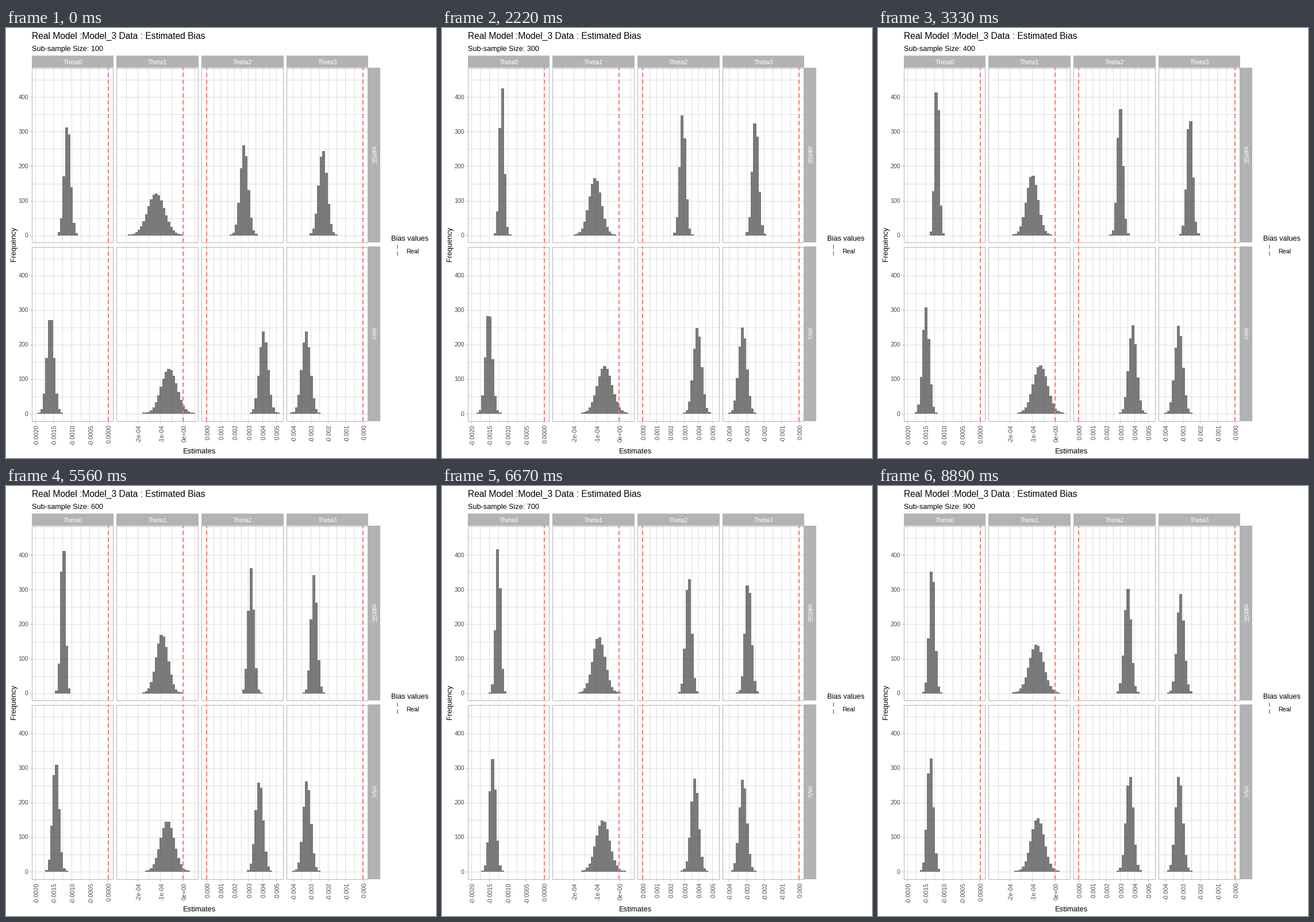
These frames come from a looping animation (748x748 px, 10 s). A matplotlib script:

```python
import math

import numpy as np
import matplotlib.pyplot as plt
from matplotlib.animation import FuncAnimation
from matplotlib.collections import LineCollection
from matplotlib.patches import Polygon, Rectangle

plt.rcParams["font.family"] = "Liberation Sans"
SIZE, DPI = 748, 100
PX = 72 / DPI
GREY, GRID, RED = "#b3b3b3", "#dedede", "#f8766d"
LEFT, PITCH, PANEL_W = 45.2, 147.69, 141.5
TOPS, PANEL_H = (69, 380), 304
BINS, BIN_W, PAD = 30, 4.287, 6.43
ZEROS, Y_UNIT = (360.2, 670.6), 0.6013
STEPS, FRAMES, LOOP = 9, 100, 10000

# Centre (in bins) of each histogram at sizes 100, 400 and 900
CENTRES = (((12.4, 11.4, 9.4), (13.9, 15.6, 17.3), (15.2, 16.8, 19.9), (12.7, 10.6, 6.9)),
           ((5.5, 6.9, 8.7), (19.2, 18.9, 17.8), (23.1, 21.9, 20.7), (5.9, 6.2, 6.3)))
# Spread over the same sizes for each row, scaled for each column
SPREADS = ((1.5, 1.04, 1.29), (1.66, 1.54, 1.4))
SCALES = ((0.79, 2.2, 1, 1.06), (0.82, 1.85, 1, 1))

# Zero x, tick spacing in pixels, tick range, value of one tick, label format
AXES = ((177.6, 31.65, range(-4, 1), 0.0005, ".4f"),
        (308.4, 39.6, range(-2, 1), 0.0001, ".0e"),
        (349.2, 24.25, range(0, 6), 0.001, ".3f"),
        (621.3, 30.4, range(-4, 1), 0.001, ".3f"))

fig = plt.figure(figsize=(SIZE / DPI, SIZE / DPI), dpi=DPI, facecolor="white")
ax = fig.add_axes([0, 0, 1, 1])
ax.set(xlim=(0, SIZE), ylim=(SIZE, 0))
ax.axis("off")


def text(x, y, s, size, color="black", ha="left", angle=0):
    return ax.text(x, y, s, size=size * PX, color=color, ha=ha, va="baseline",
                   rotation=angle, rotation_mode="anchor")


def mid(v):
    return math.floor(v) + 0.5


def lines(segments, color, z):
    ax.add_collection(LineCollection(segments, colors=color, linewidths=PX, zorder=z))


def vline(x, y0, y1):
    ax.plot([x, x], [y0, y1], color=RED, lw=2 * PX, dashes=(3.5, 2.5),
            dash_capstyle="butt", zorder=4)


def strip(x, y, w, h):
    ax.add_patch(Rectangle((x, y), w, h, color=GREY, lw=0, zorder=2))


def through(keys, n):
    """Parabola in sqrt(n) through the values at 100, 400 and 900."""
    a, b, c = keys
    t = math.sqrt(n) / 10 - 2
    return b + (c - a) / 2 * t + ((a + c) / 2 - b) * t * t


def histogram(row, col, n):
    mu = through(CENTRES[row][col], n)
    sd = SCALES[row][col] * through(SPREADS[row], n)
    cdf = [0.5 * (1 + math.erf((i - 0.5 - mu) / (sd * math.sqrt(2))))
           for i in range(BINS + 1)]
    counts = np.round(1000 * np.diff(cdf))
    base = math.floor(ZEROS[row]) + 1
    tops = np.where(counts > 0, np.floor(ZEROS[row] - Y_UNIT * counts), base)
    tops = np.concatenate(([base], tops, [base]))
    edges = np.floor(LEFT + PITCH * col + PAD + BIN_W * np.arange(BINS + 1))
    edges += np.diff(tops) > 0  # falling sides include their last pixel
    return np.column_stack((np.repeat(edges, 2), np.repeat(tops, 2)[1:-1]))


bars = {}
for row, top in enumerate(TOPS):
    bottom = top + PANEL_H
    levels = [ZEROS[row] - Y_UNIT * v for v in range(0, 451, 50)]
    for col, (zero, step, ticks, unit, form) in enumerate(AXES):
        left = mid(LEFT + PITCH * col)
        right = mid(LEFT + PITCH * col + PANEL_W)
        halves = range(2 * ticks[0] - 1, 2 * ticks[-1] + 2)
        xs = [mid(zero + step * h / 2) for h in halves]
        lines([[(x, top), (x, bottom)] for x in xs if left < x < right]
              + [[(left, mid(y)), (right, mid(y))] for y in levels], GRID, 1)
        bars[row, col] = ax.add_patch(Polygon(
            histogram(row, col, 100), facecolor="#595959", alpha=0.8,
            lw=0, antialiased=False, zorder=3))
        vline(round(zero), bottom, top)
        ax.add_patch(Rectangle((left, top + 0.5), right - left, PANEL_H - 1,
                               fill=False, edgecolor=GREY, lw=PX, zorder=5))
        if row:
            for k in ticks:
                x = zero + step * k
                lines([[(mid(x), bottom), (mid(x), bottom + 3)]], GREY, 2)
                text(x + 5.3, 690, format(k * unit, form), 10.6, "#4d4d4d", "right", 90)
        else:
            strip(left - 0.5, 48, right - left + 1, 21)
            text((left + right) / 2, 63, f"Theta{col}", 10.6, "white", "center")
    for v, y in zip(range(0, 401, 100), levels[::2]):
        lines([[(42, mid(y)), (45, mid(y))]], GREY, 2)
        text(39, y + 4, str(v), 10.6, "#4d4d4d", "right")
    strip(630, top, 21, PANEL_H)
    text(635.5, top + PANEL_H / 2, ("mMSE", "mVc")[row], 10.6, "white", "center", -90)

text(45, 19, "Real Model :Model_3 Data : Estimated Bias", 15.6)
subtitle = text(45, 40, "", 12.6)
text(337, 740, "Estimates", 13, ha="center")
text(17, 376, "Frequency", 12.8, ha="center", angle=90)
text(670, 370, "Bias values", 12.8)
text(696, 391.5, "Real", 10.8)
vline(681, 396, 376)


def update(i):
    n = 100 * (min(i * STEPS // (FRAMES - 1), STEPS - 1) + 1)
    subtitle.set_text(f"Sub-sample Size: {n}")
    for (row, col), bar in bars.items():
        bar.set_xy(histogram(row, col, n))
    return [subtitle, *bars.values()]


anim = FuncAnimation(fig, update, frames=FRAMES, interval=LOOP / FRAMES,
                     repeat=True, repeat_delay=0, blit=False)
plt.show()
```
